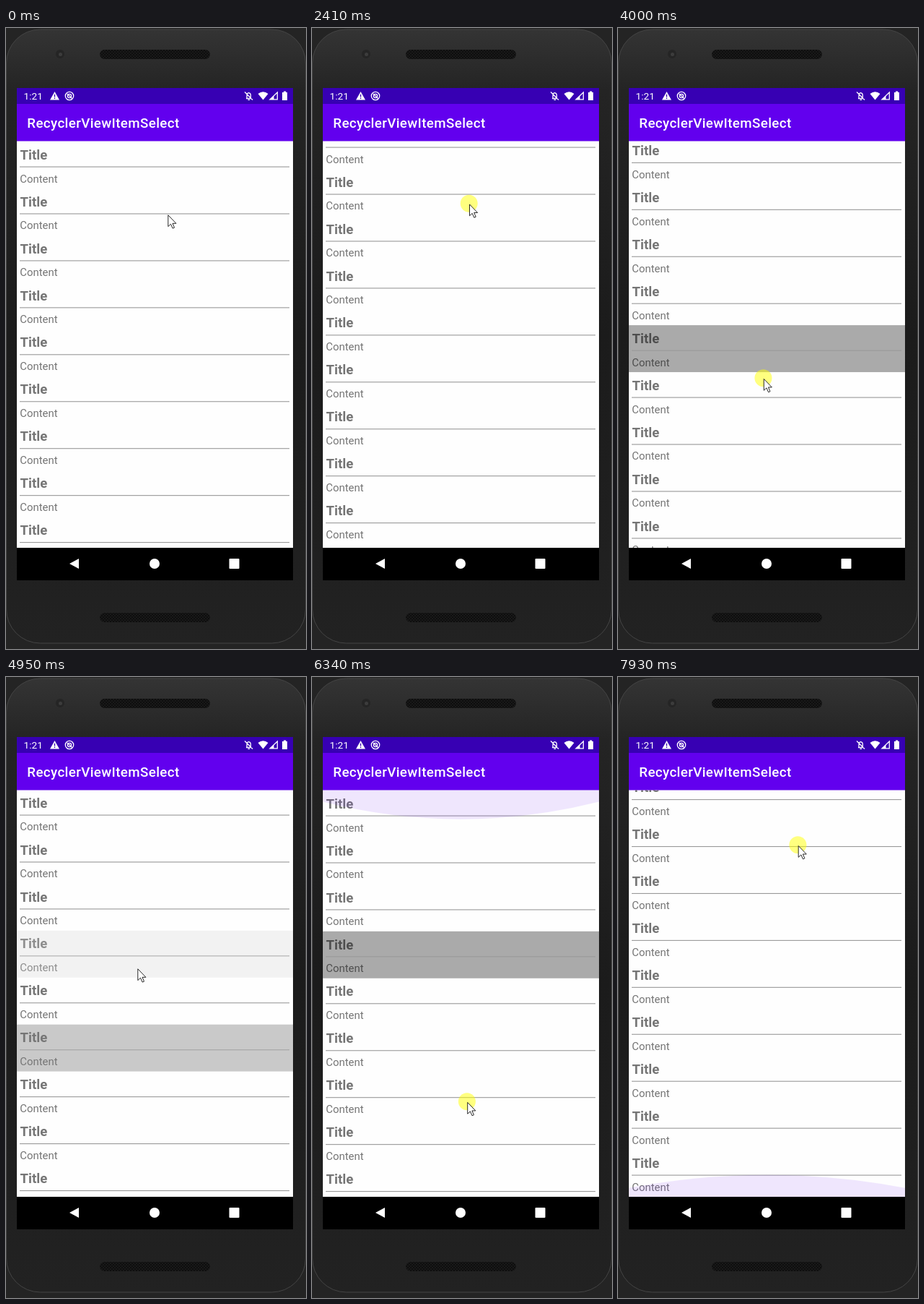
An HTML page that plays this animation: 416 by 859 pixels, repeating every 8 s.

```html
<!DOCTYPE html>
<html lang="en">
<head>
<meta charset="utf-8">
<title>List item selection</title>
<style>
  html, body { margin: 0; width: 100%; height: 100%; overflow: hidden; background: #242424; }
  svg { display: block; width: 416px; height: 859px; font-family: Roboto, sans-serif; }
  .bar { font-size: 18.8px; font-weight: 500; letter-spacing: .019em; }
  .title { font-size: 18.6px; font-weight: 700; }
  .content { font-size: 14.9px; }
  .ink { fill: #000; fill-opacity: .54; }
</style>
</head>
<body>
<svg viewBox="0 0 416 859">
  <defs>
    <linearGradient id="body" x2="0" y2="1">
      <stop offset="0" stop-color="#343434"/>
      <stop offset=".1" stop-color="#242424"/>
      <stop offset=".5" stop-color="#1b1b1b"/>
      <stop offset="1" stop-color="#222"/>
    </linearGradient>
    <pattern id="mesh" width="4" height="4" patternUnits="userSpaceOnUse">
      <rect width="4" height="4" fill="#191919"/>
      <circle cx="1" cy="1" r=".9" fill="#080808"/>
      <circle cx="3" cy="3" r=".9" fill="#080808"/>
    </pattern>
    <clipPath id="view"><rect x="15" y="156.5" width="383" height="562.5"/></clipPath>
  </defs>

  <!-- Phone -->
  <rect width="416" height="859" fill="#242424"/>
  <rect x=".5" y="2" width="415" height="849" rx="47" fill="url(#body)" stroke="#444"/>
  <rect x="130" y="30" width="153" height="13" rx="6.5" fill="url(#mesh)"/>
  <rect x="130" y="809" width="153" height="13" rx="6.5" fill="url(#mesh)"/>
  <circle cx="75" cy="36" r="6" fill="#252525"/>
  <circle cx="75.5" cy="36.5" r="2.5" fill="#3c3c3c"/>

  <!-- Status bar -->
  <rect x="15" y="83" width="383" height="22.5" fill="#3700b3"/>
  <g fill="#fff">
    <text x="24.6" y="99" font-size="13.7">1:21</text>
    <path d="M67.5 88 74 99.5H61Z"/>
    <path d="M67.5 91.8V95.6M67.5 96.6V98" stroke="#3700b3" stroke-width="1.3"/>
    <g fill="none" stroke="#fff" stroke-width="1.3">
      <circle cx="88" cy="94" r="5.7"/>
      <circle cx="88" cy="94" r="2.6"/>
      <path d="M85 91 91.5 97.5"/>
      <path d="M333 97.5H340.5M334 97V92.5Q334.3 90 336.5 89.6Q339 90 339.3 92.5V96M331 88.5 342 99.5M335.5 99.3H338"/>
      <path d="M366 98.8H376.3V89Z"/>
    </g>
    <path d="M349.5 91Q356.5 85.5 363.5 91L356.5 99.5Z"/>
    <path d="M366 99 371.5 94V99Z"/>
    <path d="M383 89H385V87.5H388.3V89H390V100H383Z"/>
  </g>

  <!-- App bar -->
  <rect x="15" y="105" width="383" height="52" fill="#6200ee"/>
  <text class="bar" x="29.3" y="138.3" fill="#fff">RecyclerViewItemSelect</text>

  <!-- List -->
  <g clip-path="url(#view)">
    <rect x="15" y="156" width="383" height="563" fill="#fefefe"/>
    <g id="list"></g>
    <path id="glow" fill="#6200ee" fill-opacity=".095"/>
  </g>

  <!-- Navigation bar -->
  <rect x="15" y="719" width="383" height="45" fill="#000"/>
  <g fill="#fff">
    <path d="M88 741 101 734V748Z"/>
    <circle cx="206" cy="741" r="7"/>
    <rect x="309.5" y="734" width="14" height="14" rx="1"/>
  </g>

  <!-- Pointer -->
  <g id="pointer">
    <circle id="press" cy="-.5" r="12" fill="#ff0" fill-opacity=".5"/>
    <path d="M.8 .8V16.6L4.5 13.2 7.1 19.1 9.5 18.1 7 12.3H11.9Z" fill="#fff" stroke="#111" stroke-width=".9"/>
  </g>
</svg>
<script>
const LOOP = 8000, ROWS = 20, PITCH = 64.94, TOP = 157, END = 719;
const MAX_SCROLL = ROWS * PITCH - (END - TOP);
const SLOP = 15;      // drag distance before the list follows
const GLIDE = 110;    // time constant of a fling, ms
const FADE = 250;     // selection cross-fade, ms

const tap = (down, up, x, y) => ({ down, up, x0: x, y0: y, x1: x, y1: y, isTap: true });
const drag = (down, up, x0, y0, x1, y1) => ({ down, up, x0, y0, x1, y1 });
const gestures = [
  tap(1190, 1317, 224, 250),
  drag(1990, 2480, 222, 415, 217, 215),
  tap(2950, 3092, 212, 291),
  drag(3580, 4060, 212, 311, 200, 509),
  tap(4720, 4846, 182, 403),
  drag(5300, 5650, 182, 403, 195, 166),
  drag(5780, 6400, 195, 166, 217, 632),
  drag(6610, 6990, 220, 600, 240, 137),
  drag(7440, 8000, 245, 480, 250, 198)
];

const el = id => document.getElementById(id);
const clamp = (v, lo, hi) => Math.min(hi, Math.max(lo, v));
const mix = (a, b, u) => a + (b - a) * u;
const ease = u => (1 - Math.cos(Math.PI * clamp(u, 0, 1))) / 2;

// The list follows each drag, then glides on; pulling past an end leaves an excess.
function scrollAt(t) {
  let scroll = 0, excess = 0;
  gestures.forEach((g, i) => {
    if (t < g.down) return;
    const next = gestures[i + 1];
    const span = g.up - g.down;
    const pull = (g.y0 - g.y1) * Math.min(1, (t - g.down) / span);
    const raw = scroll + Math.sign(pull) * Math.max(0, Math.abs(pull) - SLOP);
    const free = Math.max(0, Math.min(t, next ? next.down : LOOP) - g.up);
    const decay = Math.exp(-free / GLIDE);
    const fling = (g.y0 - g.y1) / span * GLIDE * (1 - decay);
    excess = (raw - clamp(raw, 0, MAX_SCROLL)) * decay;
    scroll = clamp(raw + fling, 0, MAX_SCROLL);
  });
  return { scroll, excess };
}

// Between gestures the pointer eases to the next starting point.
function pointerAt(t) {
  let last = { up: 400, x1: 224, y1: 258 };
  for (const g of gestures) {
    if (t < g.down) {
      const u = ease(((t - last.up) / (g.down - last.up) - .15) / .45);
      return { x: mix(last.x1, g.x0, u), y: mix(last.y1, g.y0, u), pressed: false };
    }
    if (t < g.up) {
      const u = (t - g.down) / (g.up - g.down);
      return { x: mix(g.x0, g.x1, u), y: mix(g.y0, g.y1, u), pressed: true };
    }
    last = g;
  }
}

const picks = gestures.filter(g => g.isTap).map(g => ({
  at: g.up,
  row: Math.floor((g.y0 - TOP + scrollAt(g.up).scroll) / PITCH)
}));

el("list").innerHTML = Array.from({ length: ROWS }, (_, i) => `
  <g transform="translate(0 ${TOP + i * PITCH})">
    <rect x="15" width="383" height="${PITCH}" fill="#aaa"/>
    <g>
      <text class="title ink" x="19.5" y="24.7">Title</text>
      <rect x="19" y="34.5" width="374" height="1.1" fill="#999"/>
      <text class="content ink" x="19.3" y="56.5">Content</text>
    </g>
  </g>`).join("");
const rows = [...el("list").children].map(g => ({ back: g.children[0], face: g.children[1] }));

// Each pick cross-fades the new row in and the previous one out.
function drawRow({ back, face }, index, t) {
  let shade = 0, ink = 1;
  picks.forEach(({ row, at }, n) => {
    const leaving = n > 0 && picks[n - 1].row === index;
    if (t < at || (row !== index && !leaving)) return;
    const p = ease((t - at) / FADE);
    shade = leaving ? 1 - p : p * p;
    ink = 1 - p * (1 - p);
  });
  back.setAttribute("opacity", shade);
  face.setAttribute("opacity", ink);
}

function drawGlow(excess) {
  const edge = excess < 0 ? TOP - .5 : END;
  const depth = -Math.sign(excess) * 3.5 * Math.sqrt(Math.abs(excess));
  const side = edge + depth * .4;
  el("glow").setAttribute("d", `M15 ${edge}V${side}Q206 ${edge + depth * 1.6} 398 ${side}V${edge}Z`);
}

function draw(t) {
  const { x, y, pressed } = pointerAt(t);
  const { scroll, excess } = scrollAt(t);
  el("pointer").setAttribute("transform", `translate(${x} ${y})`);
  el("press").setAttribute("opacity", pressed ? 1 : 0);
  el("list").setAttribute("transform", `translate(0 ${-scroll})`);
  rows.forEach((row, i) => drawRow(row, i, t));
  drawGlow(excess);
}

const start = performance.now();
function tick() {
  draw((performance.now() - start) % LOOP);
  requestAnimationFrame(tick);
}
tick();
</script>
</body>
</html>
```
